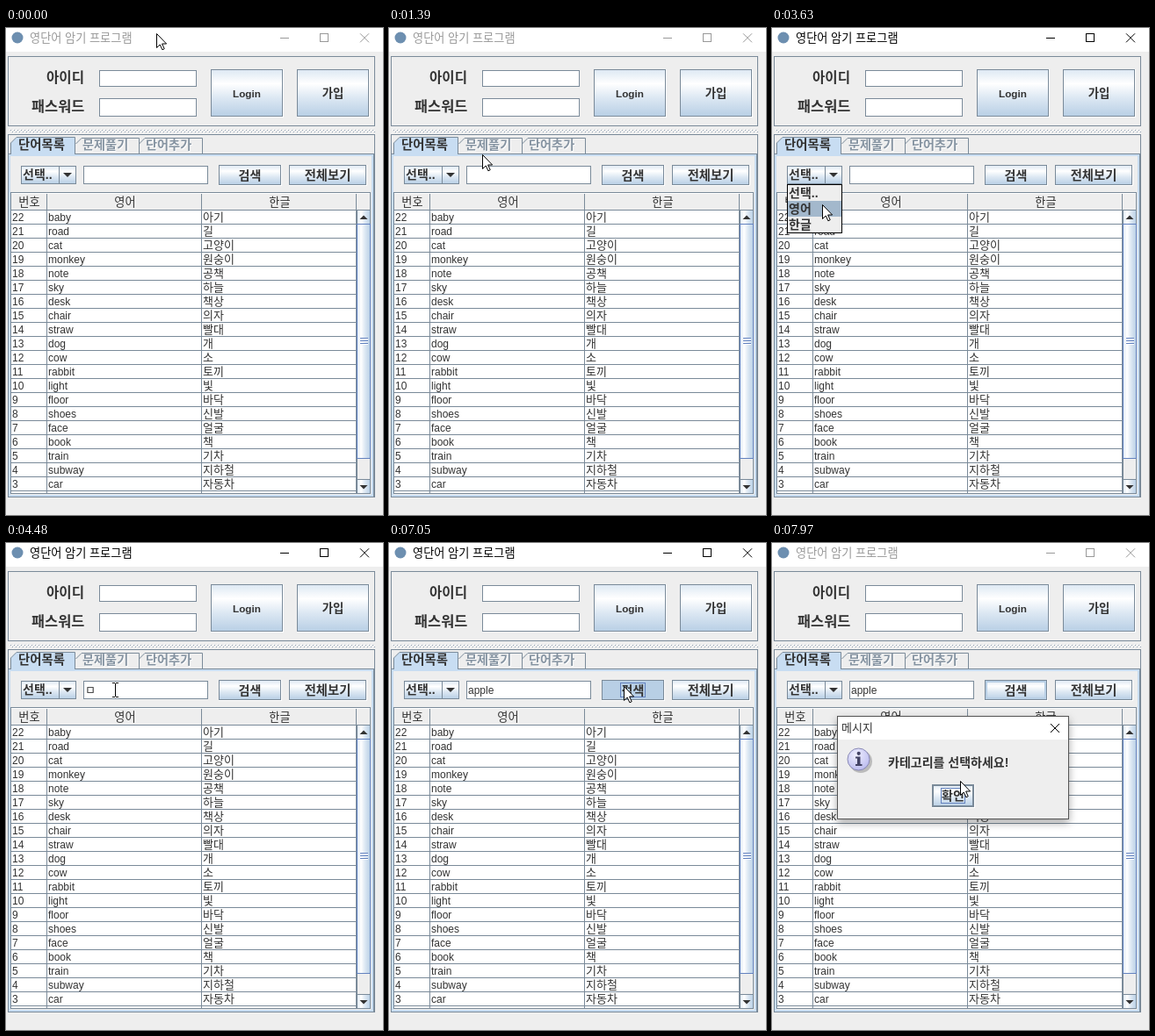
An HTML page for the animation above (8 s loop, 429x555 px).

```html
<!DOCTYPE html>
<html lang="ko">
<head>
<meta charset="utf-8">
<title>영단어 암기 프로그램</title>
<style>
html, body { margin: 0; width: 100%; height: 100%; overflow: hidden; background: #eee; }
svg { display: block; width: 429px; height: 555px; }
text { font: 13px "Liberation Sans", "Noto Sans CJK KR", sans-serif; fill: #333; white-space: pre; }
.b { font-weight: bold; }
.en { font-size: 12px; }
.crisp { shape-rendering: crispEdges; }
</style>
</head>
<body>
<svg id="stage" viewBox="0 0 429 555" xmlns="http://www.w3.org/2000/svg">
  <defs>
    <linearGradient id="steel" x2="0" y2="1">
      <stop offset="0" stop-color="#dde8f3"/><stop offset=".3" stop-color="#fff"/>
      <stop offset=".6" stop-color="#dde8f3"/><stop offset="1" stop-color="#b8cfe5"/>
    </linearGradient>
    <linearGradient id="thumb">
      <stop offset="0" stop-color="#dde8f3"/><stop offset=".3" stop-color="#fff"/>
      <stop offset=".6" stop-color="#dde8f3"/><stop offset="1" stop-color="#b8cfe5"/>
    </linearGradient>
    <radialGradient id="orb" cx=".4" cy=".3" r=".75">
      <stop offset="0" stop-color="#f0f0ff"/><stop offset="1" stop-color="#b9b9ee"/>
    </radialGradient>
    <pattern id="bumps" width="4" height="4" x="4" y="115" patternUnits="userSpaceOnUse">
      <path d="M0 0h1v1h-1zM2 2h1v1h-1z" fill="#fff"/>
      <path d="M1 1h1v1h-1zM3 3h1v1h-1z" fill="#8f9fb2"/>
    </pattern>
    <filter id="shadow" x="-10%" y="-15%" width="120%" height="140%">
      <feDropShadow dx="0" dy="4" stdDeviation="5" flood-color="#000" flood-opacity=".35"/>
    </filter>
  </defs>
</svg>
<script>
const LOOP = 8000;
const LINE = '#7a8a99', PALE = '#c8ddf2', BLUE = '#6382bf';
const stage = document.getElementById('stage');

function add(parent, tag, attrs, text) {
  const el = document.createElementNS('http://www.w3.org/2000/svg', tag);
  for (const key in attrs) el.setAttribute(key, attrs[key]);
  if (text !== undefined) el.textContent = text;
  parent.appendChild(el);
  return el;
}
const group = (parent = stage) => add(parent, 'g', {});
const fill = (p, x, y, width, height, color) =>
  add(p, 'rect', { x, y, width, height, fill: color, class: 'crisp' });
// Bordered box given by its outer pixel bounds.
const box = (p, x, y, x2, y2, color = 'none', stroke = LINE) =>
  add(p, 'rect', { x: x + .5, y: y + .5, width: x2 - x - 1, height: y2 - y - 1, fill: color, stroke, class: 'crisp' });
const path = (p, d, stroke = LINE, color = 'none') => add(p, 'path', { d, stroke, fill: color });
const lines = (p, d, stroke = LINE) => add(p, 'path', { d, stroke, fill: 'none', class: 'crisp' });
const label = (p, x, y, text, cls = '', size, anchor = 'start') =>
  add(p, 'text', { x, y, class: cls, 'text-anchor': anchor, style: size ? `font-size:${size}px` : '' }, text);
const show = (el, on) => el.setAttribute('visibility', on ? 'visible' : 'hidden');

function button(p, x, y, x2, y2, text, size = 14) {
  const face = box(p, x, y, x2, y2, 'url(#steel)');
  lines(p, `M${x} ${y2 + .5}H${x2}M${x2 + .5} ${y}V${y2 + 1}`, '#fff');
  const caption = label(p, (x + x2) / 2, (y + y2) / 2 + 5, text, 'b', size, 'middle');
  return { face, caption };
}

// Title bar
fill(stage, 0, 0, 429, 27, '#fff');
add(stage, 'circle', { cx: 13, cy: 11, r: 6.5, fill: '#6d8fb0' });
const title = label(stage, 27, 15.5, '영단어 암기 프로그램', '', 13.2);
const frameIcons = group();
lines(frameIcons, 'M312 11.5H322M357.5 6.5H366.5V15.5H357.5Z', 'inherit');
path(frameIcons, 'M403 6.3L413 16.3M413 6.3L403 16.3', 'inherit');
for (const icon of frameIcons.children) icon.removeAttribute('stroke');

// Login panel
box(stage, 2, 32, 420, 112);
label(stage, 46, 62, '아이디', 'b', 15.6);
label(stage, 29, 95, '패스워드', 'b', 16.4);
box(stage, 106, 48, 217, 67, '#fff');
box(stage, 106, 80, 217, 101, '#fff');
button(stage, 233, 47, 315, 101, 'Login', 11.7);
button(stage, 331, 47, 413, 101, '가입', 13.4);
fill(stage, 4, 115, 416, 5, 'url(#bumps)');

// Tabs
lines(stage, 'M2.5 534V121.5H420');
lines(stage, 'M419.5 122V535');
box(stage, 2, 143, 419, 535, '#eee');
add(stage, 'rect', { x: 4, y: 145, width: 413, height: 388, fill: 'none', stroke: PALE, 'stroke-width': 2 });
path(stage, 'M79.5 132L86 125.5H151.5V143M151.5 132L158 125.5H223.5V143');
path(stage, 'M5.5 144V131L12 124.5H78.5V144', LINE, PALE);
fill(stage, 6, 142, 72, 4, PALE);
label(stage, 14, 138, '단어목록', 'b', 14.4);
for (const [x, name] of [[87, '문제풀기'], [159, '단어추가']]) {
  label(stage, x + 1, 139, name, 'b', 14.2).style.fill = '#fff';
  label(stage, x, 138, name, 'b', 14.2).style.fill = '#8593a1';
}
const tabFocus = path(stage, 'M7.5 142.5V131.5L12.5 126.5H76.5V142.5Z', BLUE);

// Search row
box(stage, 17, 157, 80, 178, 'url(#steel)');
lines(stage, 'M60.5 158V177');
path(stage, 'M65 165H75L70 170Z', 'none', '#333');
label(stage, 19, 172, '선택..', 'b', 14);
box(stage, 88, 157, 230, 178, '#fff');
const typed = label(stage, 90, 172, '', 'en');
const caret = fill(stage, 90, 160, 1, 15, '#333');
const search = button(stage, 242, 156, 313, 179, '검색', 14);
const searchGlow = add(stage, 'rect', { x: 244, y: 158, width: 67, height: 19, fill: 'none', stroke: '#b8cfe5', 'stroke-width': 2 });
const searchFocus = box(stage, 263, 159, 292, 176, 'none', BLUE);
button(stage, 322, 156, 410, 179, '전체보기', 14.3);

// Word table
const WORDS = ('baby 아기,road 길,cat 고양이,monkey 원숭이,note 공책,sky 하늘,desk 책상,chair 의자,straw 빨대,dog 개,' +
  'cow 소,rabbit 토끼,light 빛,floor 바닥,shoes 신발,face 얼굴,book 책,train 기차,subway 지하철,car 자동차').split(',');
box(stage, 5, 187, 415, 531, '#fff');
fill(stage, 6, 188, 408, 19, '#eee');
lines(stage, 'M6 207.5H414M46.5 188V530M222.5 188V530M398.5 188V530');
lines(stage, 'M6 188.5H414', '#fff');
[[26.5, '번호'], [135.5, '영어'], [311.5, '한글']].forEach(([x, name]) =>
  label(stage, x, 203, name, '', 13.2, 'middle'));
WORDS.forEach((pair, i) => {
  const [en, ko] = pair.split(' '), y = 220 + 16 * i;
  label(stage, 7, y, 22 - i, 'en');
  label(stage, 48, y, en, 'en');
  label(stage, 224, y, ko);
  lines(stage, `M6 ${y + 3.5}H399`);
});

// Scroll bar
fill(stage, 399, 208, 15, 322, '#eee');
lines(stage, 'M399.5 208V530');
box(stage, 399, 207, 415, 224, 'url(#thumb)');
box(stage, 399, 514, 415, 531, 'url(#thumb)');
path(stage, 'M402.5 218H411.5L407 213.5Z', 'none', '#333');
path(stage, 'M402.5 521H411.5L407 525.5Z', 'none', '#333');
box(stage, 399, 223, 415, 491, 'url(#thumb)', BLUE);
lines(stage, 'M403 353.5H412M403 356.5H412M403 359.5H412', BLUE);
lines(stage, 'M403 354.5H412M403 357.5H412M403 360.5H412', '#fff');

// Combo popup
const popup = group();
box(popup, 17, 178, 80, 234, '#eee', '#000');
const choice = fill(popup, 18, 179, 61, 18, '#a3b8cc');
['선택..', '영어', '한글'].forEach((name, i) => label(popup, 19, 193 + 18 * i, name, 'b', 14));

// Message dialog
const dialog = group();
const sheet = box(dialog, 74, 197, 338, 315, '#eee', '#555');
sheet.setAttribute('filter', 'url(#shadow)');
fill(dialog, 75, 198, 262, 26, '#fff');
label(dialog, 79, 215, '메시지');
path(dialog, 'M317 206L327 216M327 206L317 216', '#000');
add(dialog, 'circle', { cx: 101, cy: 249, r: 13, fill: '#999', opacity: .6 });
add(dialog, 'circle', { cx: 98.5, cy: 246.5, r: 12.5, fill: 'url(#orb)', stroke: '#8888b5' });
path(dialog, 'M95 243.5H100.5V252H102.5V254H95V252H97V245.5H95Z', 'none', '#444466');
add(dialog, 'circle', { cx: 98.7, cy: 239.8, r: 2.1, fill: '#444466' });
label(dialog, 132, 255, '카테고리를 선택하세요!', 'b', 14);
button(dialog, 182, 275, 230, 301, '확인', 14);
box(dialog, 183, 276, 229, 300);
box(dialog, 192, 279, 220, 297, 'none', BLUE);

// Mouse pointers
const arrow = group();
path(arrow, 'M.5 .5V16.5L4.2 13L6.9 18.8L9.2 17.7L6.6 12H11.6Z', '#000', '#fff');
const beam = group();
lines(beam, 'M-3 -7.5H0M1 -7.5H4M.5 -7V8M-3 8.5H0M1 8.5H4', '#000');

// Pointer moves: first step, last step, number of steps, end point.
const START = [171, 6];
const MOVES = [
  [70, 690, 9, 63, 158], [840, 840, 1, 62, 163],
  [1070, 1390, 5, 106, 144], [1460, 1850, 6, 85, 127],
  [1930, 2000, 2, 112, 127], [2320, 2470, 3, 172, 134],
  [2700, 2700, 1, 172, 135], [2780, 3010, 4, 63, 169],
  [3470, 3630, 3, 57, 201], [3930, 4330, 6, 124, 167],
  [6500, 6880, 6, 267, 163], [7430, 7970, 8, 214, 271]
];
const ease = u => u * u * (3 - 2 * u);

function pointerAt(t) {
  let [x, y] = START;
  for (const [from, to, steps, endX, endY] of MOVES) {
    if (t < from) break;
    const gap = steps > 1 ? (to - from) / (steps - 1) : 1;
    const step = Math.min(steps, Math.floor((t - from) / gap + 1e-6) + 1);
    const u = ease(step / steps);
    x += (endX - x) * u;
    y += (endY - y) * u;
  }
  return [Math.round(x), Math.round(y)];
}

const KEYS = [5170, 5340, 5570, 5720, 5870];
const CARETS = [90, 97, 104, 111, 114, 121];
const within = (t, a, b) => t >= a && t < b;

function draw(t) {
  const [x, y] = pointerAt(t);

  const active = within(t, 1620, 7270);
  title.style.fill = active ? '#000' : '#999';
  frameIcons.setAttribute('stroke', active ? '#000' : '#999');
  show(tabFocus, within(t, 1620, 3190));

  show(popup, within(t, 3240, 4170));
  choice.setAttribute('y', y >= 197 || t >= 3930 ? 197 : 179);

  const count = KEYS.filter(k => t >= k).length;
  const composing = within(t, 4480, 4940);
  typed.textContent = composing ? 'ㅁ' : 'apple'.slice(0, count);
  typed.style.fontSize = composing ? '13px' : '';
  caret.setAttribute('x', CARETS[count]);
  show(caret, within(t, 5170, 6350) || within(t, 6830, 7050));

  const pressed = within(t, 7050, 7200);
  search.face.setAttribute('fill', pressed ? '#b8cfe5' : 'url(#steel)');
  show(searchGlow, t > 6500 && x >= 242 && !pressed || t >= 7200);
  show(searchFocus, within(t, 7050, 7270));

  const open = Math.min(1, (Math.floor((t - 7270) / 80) + 1) / 3);
  show(dialog, open > 0);
  if (open > 0) {
    const scale = .9 + .1 * open;
    dialog.setAttribute('opacity', open);
    dialog.setAttribute('transform', `translate(206 256) scale(${scale}) translate(-206 -256)`);
  }

  const overField = within(x, 88, 230) && within(y, 157, 178) && t > 3930;
  show(arrow, !overField);
  show(beam, overField);
  (overField ? beam : arrow).setAttribute('transform', `translate(${x} ${y})`);
}

const began = performance.now();
function tick() {
  draw((performance.now() - began) % LOOP);
  requestAnimationFrame(tick);
}
tick();
</script>
</body>
</html>
```
